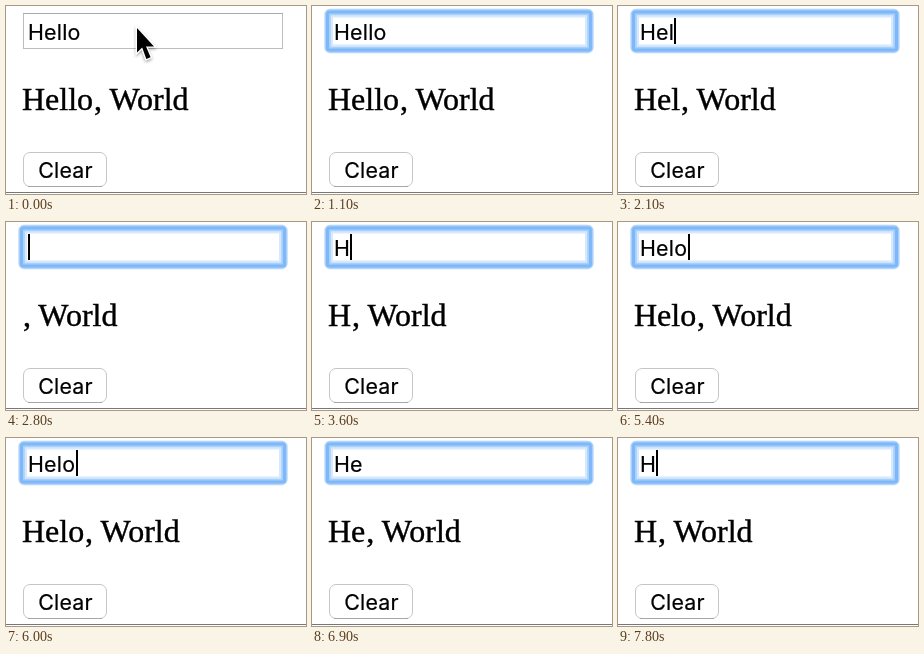
Animation of 300 by 188 pixels, one loop 8000 ms. Source, as an HTML page:

```html
<!DOCTYPE html>
<html lang="en">
<head>
<meta charset="utf-8">
<title>Greeting field</title>
<style>
  html, body { margin: 0; width: 100%; height: 100%; overflow: hidden; background: #fff; }
  svg { display: block; width: 100vw; height: 100vh; }
  text { stroke: #000; }
  .ui { font: 21.4px Inter, Roboto, sans-serif; letter-spacing: .2px; stroke-width: .2px; }
  .page { font: 32px "Liberation Serif", "Times New Roman", serif; stroke-width: .4px; }
</style>
</head>
<body>
<svg viewBox="0 0 300 188">
  <defs>
    <filter id="soft" x="-50%" y="-50%" width="200%" height="200%">
      <feDropShadow dx="0" dy="1.5" stdDeviation="1.5" flood-opacity=".4"/>
    </filter>
  </defs>

  <rect x="17.5" y="7.5" width="259" height="35" fill="#fff" stroke="#bdbdbd"/>
  <path d="M17 7.5H277" stroke="#a8a8a8"/>
  <g id="ring" fill="none">
    <rect x="16.5" y="7" width="261" height="36" rx="2" stroke="#d6e9fd" stroke-width="9"/>
    <rect x="15.8" y="6.3" width="262.4" height="37.4" rx="2" stroke="#a9d0fb" stroke-width="6"/>
    <rect x="15.5" y="6" width="263" height="38" rx="2" stroke="#7fb8f8" stroke-width="3"/>
  </g>
  <text id="typed" class="ui" x="22" y="34"></text>
  <rect id="caret" y="12" width="2" height="26"/>

  <text class="page" x="16" y="104"><tspan id="name"></tspan><tspan dx=".9">, World</tspan></text>

  <rect x="17.5" y="146.5" width="83" height="34" rx="6.5" fill="#fff" stroke="#c6c6c6"/>
  <path d="M22 180.5H96" stroke="#a6a6a6"/>
  <text class="ui" x="32.2" y="172">Clear</text>
  <rect y="186" width="300" height="1" fill="#777"/>

  <path id="arrow" d="M131 22V46.5L136.2 41.5L140.3 53L144.6 51.2L140 40.4H148Z"
        stroke="#fff" stroke-width="2.4" paint-order="stroke" filter="url(#soft)"/>
  <path id="beam" d="M123 9Q129 9 129 13V35Q129 39 123 39M135 9Q129 9 129 13M135 39Q129 39 129 35M126 27H132"
        fill="none" stroke="#222" stroke-width="1.8"/>
</svg>
<script>
const LOOP = 8000;

// start ms, field text, caret shown, pointer, focus ring opacity
const steps = [
  [0, "Hello", 0, "arrow", 0],
  [600, "Hello", 1, "beam", 0.5],
  [700, "Hello", 1, "beam"],
  [1000, "Hello", 1],
  [1100, "Hello", 0],
  [1600, "Hello", 1],
  [1800, "Hell", 1],
  [2100, "Hel", 1],
  [2400, "He", 1],
  [2600, "H", 1],
  [2800, "", 1],
  [3400, "", 0],
  [3600, "H", 1],
  [4200, "H", 0],
  [4700, "He", 1],
  [5100, "Hel", 1],
  [5400, "Helo", 1],
  [5500, "Heloo", 1],
  [5900, "Heloo", 0],
  [6000, "Helo", 1],
  [6200, "Hel", 1],
  [6400, "He", 1],
  [6900, "He", 0],
  [7200, "H", 1],
  [7300, "", 1],
  [7800, "H", 1],
];

const advance = { H: 16.8, e: 12.5, l: 5.8, o: 12.9 };
const el = id => document.getElementById(id);
const show = (id, on) => el(id).setAttribute("visibility", on ? "visible" : "hidden");

// The caret snaps to whole points, two pixels each.
function caretX(text) {
  const end = [...text].reduce((x, c) => x + advance[c], 22);
  return Math.floor(end / 2) * 2;
}

let current;

function render(time) {
  const step = steps.findLast(([start]) => start <= time);
  if (step === current) return;
  current = step;
  const [, text, caretOn, pointer, ring = 1] = step;
  el("typed").textContent = text;
  el("name").textContent = text;
  el("caret").setAttribute("x", caretX(text));
  el("ring").setAttribute("opacity", ring);
  show("caret", caretOn);
  show("arrow", pointer === "arrow");
  show("beam", pointer === "beam");
}

const begin = performance.now();
function tick() {
  render((performance.now() - begin) % LOOP);
  requestAnimationFrame(tick);
}
tick();
</script>
</body>
</html>
```
